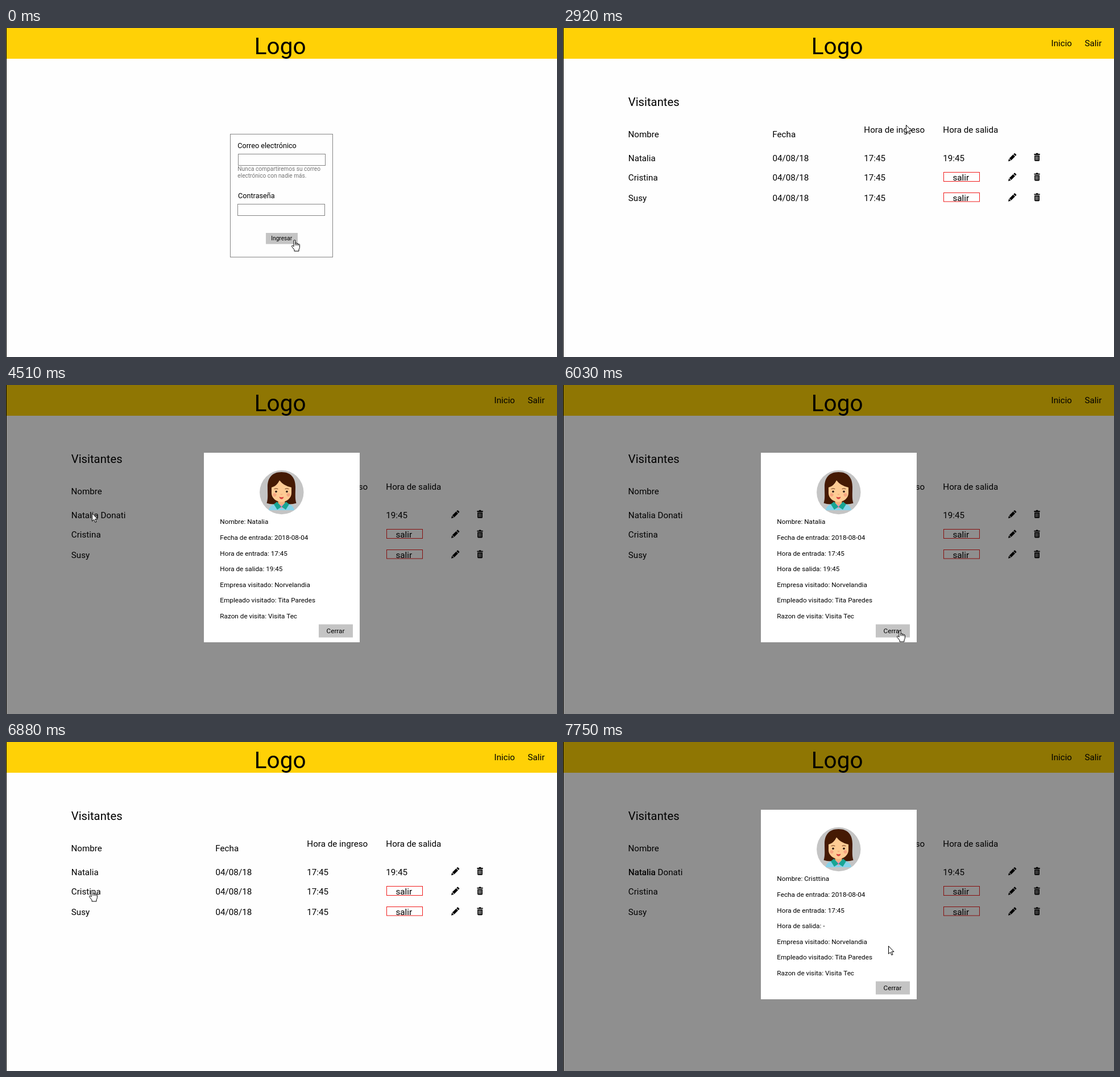
An HTML page that plays this animation: 969x578 px, repeating every 8000 ms.

```html
<!DOCTYPE html>
<html lang="es">
<head>
<meta charset="utf-8">
<title>Visitantes</title>
<style>
html, body { margin: 0; width: 100%; height: 100%; overflow: hidden; background: #fefefe; }
svg { display: block; width: 969px; height: 578px; font: 15.19px Roboto, sans-serif; }
.logo { font-size: 40.5px; }
.title { font-size: 20.25px; }
.label { font-size: 12.66px; }
.small { font-size: 10.13px; }
.card { font-size: 11.75px; }
.line { fill: none; stroke: #858585; }
.exit { fill: none; stroke: #f01c1c; }
.button { fill: #c4c4c4; }

.login, .home, .modal, .first, .second, .hand, .arrow, .cursor {
  animation: 8s step-end infinite;
}
.login { animation-name: login; }
.home { animation-name: home; }
.modal { animation-name: modal; }
.first { animation-name: first; }
.second { animation-name: second; }
.hand { animation-name: hand; }
.arrow { animation-name: arrow; }
.cursor { animation-name: move; }

@keyframes login {
  0% { visibility: visible }
  19.375%, 100% { visibility: hidden }
}
@keyframes home {
  0% { visibility: hidden }
  19.375%, 100% { visibility: visible }
}
@keyframes modal {
  0%, 76.875% { visibility: hidden }
  56.375%, 89.125%, 100% { visibility: visible }
}
@keyframes first {
  0%, 76.875%, 100% { visibility: hidden }
  56.375% { visibility: visible }
}
@keyframes second {
  0% { visibility: hidden }
  89.125%, 100% { visibility: visible }
}
@keyframes hand {
  0%, 51.625%, 67.125%, 70.625%, 86% { visibility: visible }
  19.375%, 56.375%, 69.125%, 76.875%, 89.125%, 100% { visibility: hidden }
}
@keyframes arrow {
  0%, 51.625%, 67.125%, 70.625%, 86% { visibility: hidden }
  19.375%, 56.375%, 69.125%, 76.875%, 89.125%, 100% { visibility: visible }
}
@keyframes move {
  /* rest on the login button */
  0% { transform: translate(507px, 372px) }
  1.5% { transform: translate(502px, 372px) }
  3% { transform: translate(493px, 373px) }
  4.5% { transform: translate(489px, 373px) }
  /* up to the table head */
  27.5% { transform: translate(482px, 368px) }
  29% { transform: translate(470px, 350px) }
  30.5% { transform: translate(466px, 318px) }
  32% { transform: translate(480px, 275px) }
  33.5% { transform: translate(520px, 225px) }
  35% { transform: translate(570px, 188px) }
  36.5% { transform: translate(603px, 170px) }
  38% { transform: translate(620px, 144px) }
  /* across to the first name */
  42.625% { transform: translate(605px, 150px) }
  44.125% { transform: translate(540px, 165px) }
  45.625% { transform: translate(440px, 187px) }
  47.125% { transform: translate(330px, 205px) }
  48.625% { transform: translate(230px, 220px) }
  50.125% { transform: translate(170px, 227px) }
  51.625% { transform: translate(152px, 225px) }
  53.125% { transform: translate(151px, 225px) }
  /* to the close button */
  59.5% { transform: translate(290px, 216px) }
  61% { transform: translate(510px, 340px) }
  62.5% { transform: translate(578px, 471px) }
  67.125% { transform: translate(587px, 426px) }
  69.125% { transform: translate(589px, 417px) }
  70.625% { transform: translate(591px, 422px) }
  72.125% { transform: translate(592px, 428px) }
  73.625% { transform: translate(592px, 431px) }
  /* back to the second name */
  80% { transform: translate(560px, 420px) }
  81.5% { transform: translate(430px, 355px) }
  83% { transform: translate(270px, 290px) }
  84.5% { transform: translate(172px, 263px) }
  86% { transform: translate(151px, 260px) }
  /* into the card */
  90.625% { transform: translate(220px, 252px) }
  92.125% { transform: translate(350px, 244px) }
  93.625% { transform: translate(474px, 246px) }
  95.375% { transform: translate(540px, 310px) }
  96.875%, 100% { transform: translate(572px, 358px) }
}
</style>
</head>
<body>
<svg viewBox="0 0 969 578">
  <defs>
    <g id="icons">
      <path d="M783 14.5l1.2-4.6 3.4 3.4zM784.9 9.2l6.7-6.7 3.4 3.4-6.7 6.7zM792.3 1.8l1.4-1.4q.6-.6 1.2 0l2.2 2.2q.6.6 0 1.2l-1.4 1.4z"/>
      <path fill-rule="evenodd" d="M828.5 1.3h3l.8-1.3h2.6l.8 1.3h3v1.8h-10.2zM829.2 4h8.8v8.6q0 1.4-1.4 1.4h-6q-1.4 0-1.4-1.4zM831 5.5v6.8h.8v-6.8zM833.2 5.5v6.8h.8v-6.8zM835.4 5.5v6.8h.8v-6.8z"/>
    </g>
  </defs>

  <rect width="969" height="578" fill="#fefefe"/>
  <rect width="969" height="54" fill="#ffd106"/>
  <text class="logo" x="436.8" y="46">Logo</text>

  <g class="login">
    <rect class="line" x="394.5" y="186.5" width="180" height="216"/>
    <text class="label" x="407.3" y="210.5">Correo electrónico</text>
    <rect class="line" x="408.5" y="221.5" width="153" height="20"/>
    <g class="small" fill="#757575">
      <text x="407.3" y="251">Nunca compartiremos su correo</text>
      <text x="407.3" y="262.8">electrónico con nadie más.</text>
    </g>
    <text class="label" x="408" y="299">Contraseña</text>
    <rect class="line" x="407.5" y="309.5" width="153" height="20"/>
    <rect class="button" x="457" y="360" width="56" height="19.5"/>
    <text class="small" x="466.3" y="373">Ingresar</text>
  </g>

  <g class="home">
    <text x="858.5" y="32">Inicio</text>
    <text x="917.5" y="32">Salir</text>
    <text class="title" x="114.8" y="137.3">Visitantes</text>
    <text x="114.5" y="191.5">Nombre</text>
    <text x="368.3" y="191.5">Fecha</text>
    <text x="529.3" y="183.7">Hora de ingreso</text>
    <text x="668.3" y="183.7">Hora de salida</text>

    <text x="114.8" y="233.6">Natalia<tspan class="first"> Donati</tspan></text>
    <text x="368.5" y="233.6">04/08/18</text>
    <text x="529.3" y="233.6">17:45</text>
    <text x="668.3" y="233.6">19:45</text>
    <use href="#icons" y="219.8"/>

    <text x="114.8" y="268.2">Cristina</text>
    <text x="368.5" y="268.2">04/08/18</text>
    <text x="529.3" y="268.2">17:45</text>
    <rect class="exit" x="669.5" y="253.5" width="63" height="16"/>
    <text x="685.5" y="268.2">salir</text>
    <use href="#icons" y="254.4"/>

    <text x="114.8" y="304">Susy</text>
    <text x="368.5" y="304">04/08/18</text>
    <text x="529.3" y="304">17:45</text>
    <rect class="exit" x="669.5" y="289.5" width="63" height="15.5"/>
    <text x="685.5" y="304">salir</text>
    <use href="#icons" y="290.2"/>
  </g>

  <g class="modal card">
    <text class="second" x="114.8" y="233.6" font-size="15.19" style="font-size:15.19px">Natalia Donati</text>
    <rect width="969" height="578" opacity=".44"/>
    <rect x="348" y="119" width="274" height="333" fill="#fff"/>

    <circle cx="484.8" cy="188.5" r="38.7" fill="#c4c4c4"/>
    <path fill="#451a04" d="M484.5 153C467 153 460 164 460 179C460 192 461 200 458.500 207.500Q468 211 484.500 208Q501 211 510.500 207.500C508 200 509 192 509 179C509 164 502 153 484.500 153z"/>
    <path fill="#86d3ea" d="M462 220C463 212 470 209.500 477 207H492C499 209.500 506 212 507 220z"/>
    <path fill="#f1b27c" d="M478.500 200h12v8q-6 6-12 0z"/>
    <path fill="#f58fb5" d="M477.500 207.500q7 6 14 0l-2 7.500q-5 3-10 0z"/>
    <path fill="#18a594" d="M476.500 205l8 9-7.500 5-6-9.500zM492.500 205l-8 9 7.500 5 6-9.500z"/>
    <path fill="#fecb94" d="M467 180Q476 178 481 167.500Q488 177 502 180V190C502 199 493 205.500 484.500 205.500S467 199 467 190z"/>
    <g fill="#f7a581">
      <circle cx="472.500" cy="193" r="3"/><circle cx="496.500" cy="193" r="3"/>
    </g>
    <g fill="#2b1a14">
      <circle cx="475" cy="187.300" r="1.800"/><circle cx="494" cy="187.300" r="1.800"/>
    </g>
    <g fill="none" stroke="#6b3518" stroke-linecap="round">
      <path d="M472 182.500q3-1.500 6 0M491 182.500q3-1.500 6 0"/>
      <path stroke="#e9a06c" d="M483.200 192q1.300.8 2.600 0"/>
    </g>
    <path fill="#d9413f" d="M480.500 196.500q4 1.500 8 0-1 4-4 4t-4-4z"/>

    <text x="376.300" y="244.200">Nombre: <tspan class="first">Natalia</tspan></text>
    <text class="second" x="376.300" y="244.200"><tspan visibility="hidden">Nombre: </tspan>Cristtina</text>
    <text x="376.300" y="271.900">Fecha de entrada: 2018-08-04</text>
    <text x="376.300" y="299.500">Hora de entrada: 17:45</text>
    <text x="376.300" y="326.700">Hora de salida: <tspan class="first">19:45</tspan></text>
    <text class="second" x="376.300" y="326.700"><tspan visibility="hidden">Hora de salida: </tspan>-</text>
    <text x="376.300" y="354.500">Empresa visitado: Norvelandia</text>
    <text x="376.300" y="382.200">Empleado visitado: Tita Paredes</text>
    <text x="376.300" y="409.900">Razon de visita: Visita Tec</text>
    <rect class="button" x="550" y="420.500" width="60" height="23"/>
    <text x="563.500" y="436.200">Cerrar</text>
  </g>

  <rect width="1" height="578"/>

  <g class="cursor" fill="#fff" stroke="#000" stroke-linejoin="round">
    <path class="arrow" d="M.5.5V14.200L3.700 11.300 5.900 16.300 8 15.400 5.900 10.500H10z"/>
    <path class="hand" d="M-1 12V2a1.500 1.500 0 0 1 3 0V7.500V6.800a1.300 1.300 0 0 1 2.600 0V8V7.500a1.300 1.300 0 0 1 2.500 0V8.800V8.500a1.200 1.200 0 0 1 2.300 0V13.500Q9.400 15 8 17V20H0V17.500L-4 12.500Q-5 10.500-3.500 10-2.300 10-1 12zM2 7.500v2.500M4.600 8v2M7.100 8.800v1.500"/>
  </g>
</svg>
</body>
</html>
```
